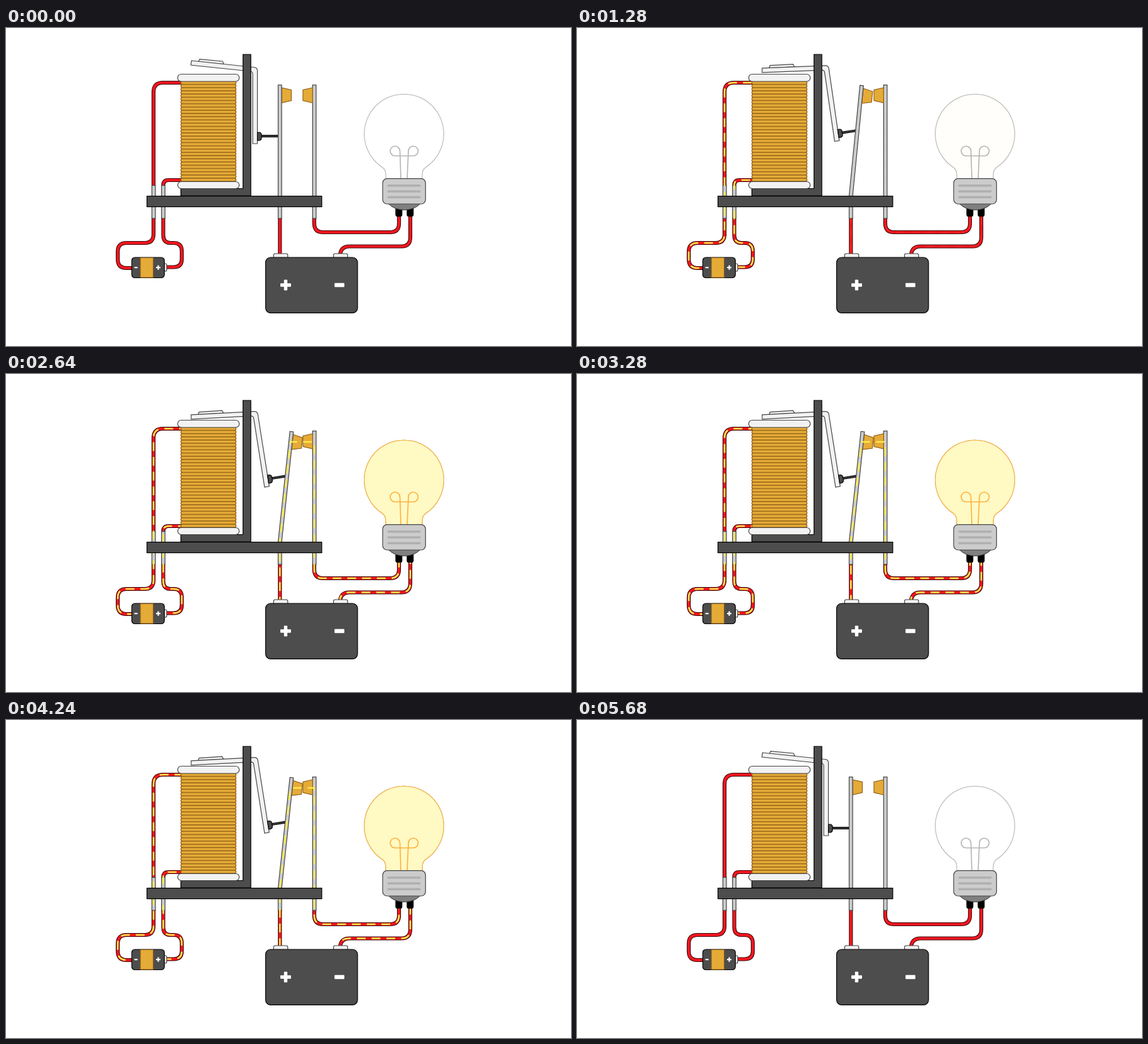
Write an HTML page that moves like this. It is 900 by 506 pixels and loops after 6.16 s.

```html
<!DOCTYPE html>
<html lang="en">
<head>
<meta charset="utf-8">
<title>Relay circuit</title>
<style>
  html, body { margin: 0; width: 100%; height: 100%; overflow: hidden; background: #fff; }
  svg { display: block; width: 100%; height: 100%; --closed: 0; --coil: 0; --lamp: 0; --flow: 0; }
  .dark { fill: #4d4d4d; stroke: #000; stroke-width: 1.2; }
  .metal { fill: #ccc; stroke: #444; stroke-width: 1.2; }
  .pale { fill: #f2f2f2; stroke: #444; stroke-width: 1.2; }
  .brass { fill: #e5ab37; stroke: #8a5a14; stroke-width: 1.1; }
  .white { fill: #fff; }
  .line { fill: none; }
  .sheath { stroke: #3a0a0c; stroke-width: 6.2; }
  .core { stroke: #f6161f; stroke-width: 4; }
  .flow { fill: none; stroke: #fee94e; stroke-width: 2.6; stroke-dasharray: 14 9.5;
          stroke-dashoffset: calc(var(--flow) * -1px); }
  .coil-flow { opacity: var(--coil); }
  .lamp-on { opacity: var(--lamp); }
  .armature { transform-origin: 377px 62px; transform: rotate(calc(var(--closed) * -9deg)); }
  .spring { transform-origin: 436.3px 267px; transform: rotate(calc(var(--closed) * 6.1deg)); }
  .glass { fill: #fff; stroke: #b3b3b3; stroke-width: 1.1; }
  .filament { fill: none; stroke: #b3b3b3; stroke-width: 1.6; }
  .lamp-on .glass { fill: #fff9c4; stroke: #fbb03b; }
  .lamp-on .filament { stroke: #fbb03b; }
</style>
</head>
<body>
<svg viewBox="0 0 900 506">
  <defs>
    <pattern id="winding" x="277" y="84.5" width="91" height="5.15" patternUnits="userSpaceOnUse">
      <rect class="brass" x="1.5" y="0" width="88" height="5.15" rx="2.5"/>
    </pattern>
    <g id="wires" class="line">
      <path d="M285 87H250Q235 87 235 102V252"/>
      <path d="M235 301V328Q235 342 221 342H192Q178 342 178 356V368Q178 382 192 382H203"/>
      <path d="M250.500 252V250Q250.500 242 259 242H285"/>
      <path d="M250.500 301V330Q250.500 342 262 342H267Q280 342 280 355V368Q280 380.500 267 380.500H252"/>
      <path d="M436.300 301V362"/>
      <path d="M491 301V311Q491 325 505 325H612Q626 325 626 311V296"/>
      <path d="M644 296V333Q644 347.500 630 347.500H547Q533 347.500 532 362"/>
    </g>
    <g id="bulb">
      <path class="glass" d="M605 241V234Q605 226 600 222A63.300 63.300 0 1 1 668 222Q663 226 663 234V241"/>
      <path class="filament" d="M629 240L627.500 196A7.750 7.750 0 1 0 620 203.500H648.500A7.750 7.750 0 1 0 641 196L639 240"/>
    </g>
  </defs>

  <use href="#wires" class="sheath"/>
  <use href="#wires" class="core"/>

  <!-- pins, springs and contacts -->
  <g class="metal">
    <rect x="232.400" y="250.500" width="5.600" height="52.500"/>
    <rect x="247.700" y="250.500" width="5.600" height="52.500"/>
    <rect x="433.500" y="275" width="5.600" height="28"/>
    <rect x="488.400" y="90.700" width="5.600" height="212.300"/>
  </g>
  <path class="brass" d="M488.400 95L473 98.500V115.500L488.400 119Z"/>

  <g class="armature">
    <path class="pale" d="M306.500 53.500L308.500 49.700L345 53L347 57.500Z"/>
    <path class="pale" d="M295.500 52L395 62.500Q400.500 63 400.500 68V184H393V73Q393 69.500 389.500 69L294.500 59Z"/>
    <path d="M406 172H434" stroke="#000" stroke-width="4"/>
    <path d="M407 172H434" stroke="#4d4d4d" stroke-width="1.600"/>
    <path class="dark" d="M400.500 166H404Q407 167 407 170V175Q407 178 404 179H400.500Z"/>
  </g>
  <g class="spring">
    <path class="brass" d="M439 95L454.500 98.500V115.500L439 119Z"/>
    <rect class="metal" x="433.500" y="90.700" width="5.600" height="184"/>
  </g>

  <g class="coil-flow">
    <path class="flow" d="M252 380.500H267Q280 380.500 280 368V355Q280 342 267 342H262Q250.500 342 250.500 330V250Q250.500 242 259 242H280"/>
    <path class="flow" d="M280 87H250Q235 87 235 102V328Q235 342 221 342H192Q178 342 178 356V368Q178 382 192 382H201"/>
  </g>
  <g class="lamp-on">
    <path class="flow" d="M436.300 359V267L453 108H491V311Q491 325 505 325H612Q626 325 626 311V298"/>
    <path class="flow" d="M644 298V333Q644 347.500 630 347.500H547Q533 347.500 532 359"/>
  </g>

  <!-- electromagnet and base -->
  <path class="dark" d="M377.500 42H390V267H278.500V255.500H377.500Z"/>
  <rect x="277" y="84.500" width="91" height="159.650" fill="url(#winding)"/>
  <rect class="pale" x="273.500" y="73.500" width="98" height="11.500" rx="5.500"/>
  <rect class="pale" x="273.500" y="244.500" width="98" height="11" rx="5.500"/>
  <rect class="dark" x="224.500" y="267.500" width="278.500" height="17"/>

  <!-- small battery -->
  <rect class="pale" x="249" y="375" width="7" height="12" rx="2"/>
  <rect class="dark" x="200.300" y="365" width="52" height="32.500" rx="5"/>
  <rect class="brass" x="214" y="365.500" width="20.500" height="31.500"/>
  <path class="white" d="M204.500 380H209.500V382.200H204.500ZM239 380H246V382.200H239ZM241.400 377.500H243.600V384.700H241.400Z"/>

  <!-- large battery -->
  <rect class="pale" x="426.300" y="359" width="22.500" height="12" rx="2.500"/>
  <rect class="pale" x="521.700" y="359" width="22.500" height="12" rx="2.500"/>
  <rect class="dark" x="413.500" y="365" width="146.500" height="88.300" rx="8"/>
  <g class="white">
    <rect x="437" y="406.300" width="17" height="5.400" rx="1"/>
    <rect x="442.800" y="400.500" width="5.400" height="17" rx="1"/>
    <rect x="523.300" y="405.800" width="15.700" height="6.400" rx="1"/>
  </g>

  <!-- lamp -->
  <use href="#bulb"/>
  <g class="lamp-on"><use href="#bulb"/>
    <path class="glass" d="M605 241V234Q605 226 600 222A63.300 63.300 0 1 1 668 222Q663 226 663 234V241"/>
    <path class="filament" d="M629 240L627.500 196A7.750 7.750 0 1 0 620 203.500H648.500A7.750 7.750 0 1 0 641 196L639 240"/>
  </g>
  <rect x="620.300" y="283" width="11" height="17.300" rx="3.500"/>
  <rect x="638.300" y="283" width="11" height="17.300" rx="3.500"/>
  <path d="M609 279.500H660Q650 289.500 634.500 289.500T609 279.500Z" fill="#808080" stroke="#333"/>
  <rect class="metal" x="600" y="239.700" width="68.300" height="40.300" rx="7"/>
  <path d="M609 250.700H659M609 260H659M609 269.300H659" stroke="#b0b0b0" stroke-width="3.400" stroke-linecap="round"/>
</svg>
<script>
  const LOOP = 6160, STEP = 80, SPEED = 6.24, PHASE = 19.3;
  const style = document.querySelector('svg').style;
  const ramp = (t, from, to) => Math.min(1, Math.max(0, (t - from) / (to - from)));
  const pulse = (t, onStart, onEnd, offStart, offEnd) =>
    ramp(t, onStart, onEnd) - ramp(t, offStart, offEnd);

  function draw(now) {
    const step = Math.floor((now % LOOP) / STEP);
    const t = step * STEP;
    style.setProperty('--coil', pulse(t, 480, 880, 5280, 5680));
    style.setProperty('--closed', pulse(t, 912, 1312, 5160, 5560));
    style.setProperty('--lamp', pulse(t, 1260, 1660, 5000, 5240));
    style.setProperty('--flow', PHASE + SPEED * step);
    requestAnimationFrame(draw);
  }
  requestAnimationFrame(draw);
</script>
</body>
</html>
```
